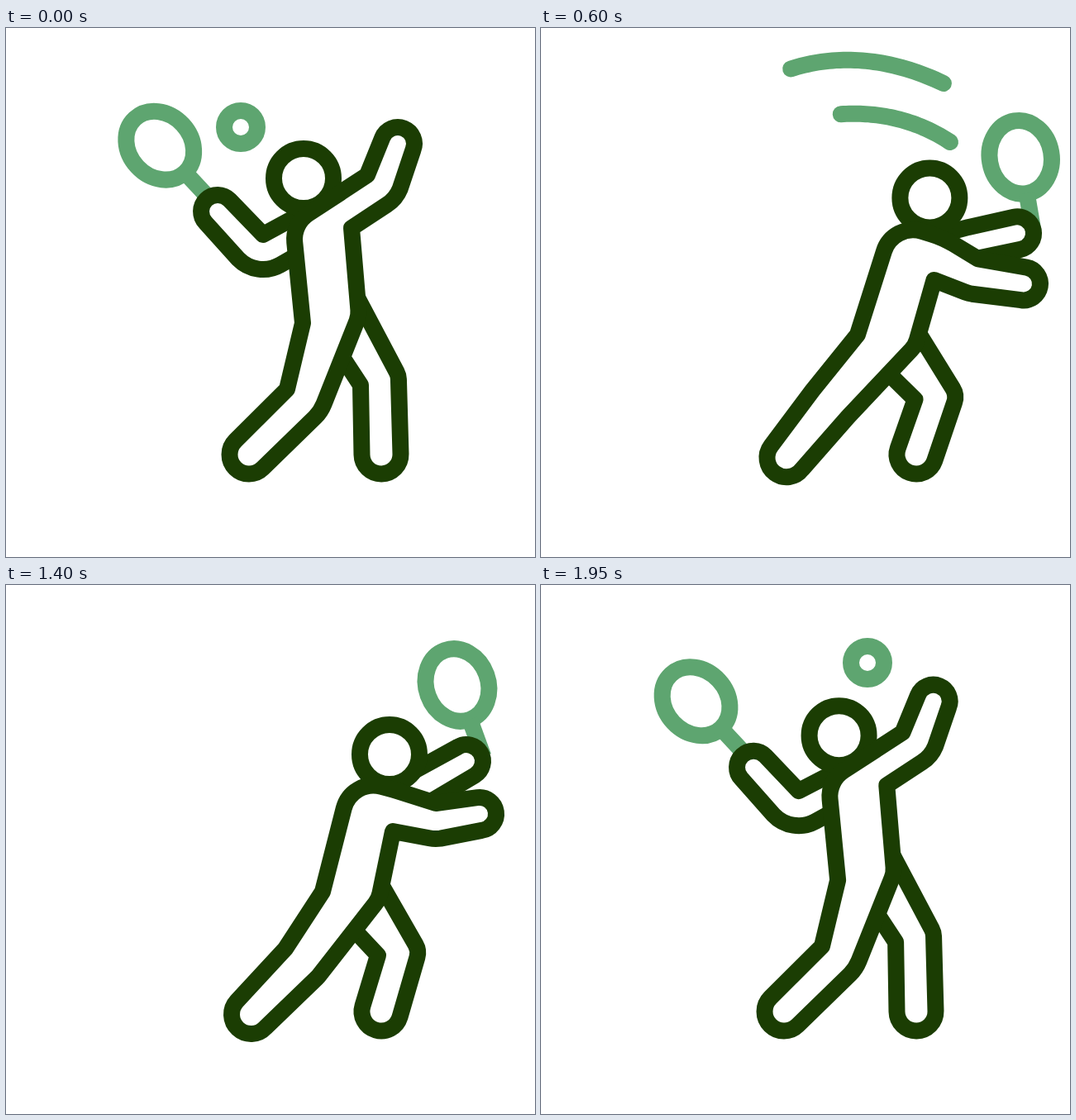
Animation, 640 px wide and 640 px high, one loop 2000 ms. Source, as an HTML page with a canvas:

```html
<!DOCTYPE html>
<html lang="en">
<head>
<meta charset="utf-8">
<title>Tennis swing</title>
<style>
html, body { margin: 0; width: 100%; height: 100%; overflow: hidden; background: #fff; }
canvas { display: block; width: 640px; height: 640px; }
</style>
</head>
<body>
<canvas id="stage" width="640" height="640"></canvas>
<script>
const c = document.getElementById('stage').getContext('2d');
const DARK = '#1b3d03', GREEN = '#5ea570';
const LOOP = 2000, STEP = 50, RAD = Math.PI / 180, Q90 = Math.PI / 2;

// Points are [x, y]; polar values are [degrees, distance]; girth is [knee, far elbow].
const ready = {
  head: [360, 182], neck: [347, 237], top: [405, 199], elbow: [437, 178], pit: [418, 242],
  hip: [427, 348], knee: [340, 437], foot: [294, 516], waist: [359, 357],
  farHip: [426, 328], farKnee: [429, 432], crotch: [410, 403], shoulder: [358, 248],
  fore: [-45.8, 53], farUpper: [177.6, 47], farFore: [207, 61.7],
  racket: [228.8, 106], tilt: [227], girth: [48, 42]
};
const strike = {
  head: [460, 200], neck: [420, 233], top: [480, 248], elbow: [523, 272], pit: [472, 300],
  hip: [451, 381], knee: [326, 437], foot: [296.5, 519], waist: [379, 369],
  farHip: [453, 364], farKnee: [451, 449], crotch: [418, 416], shoulder: [478, 262],
  fore: [30.5, 65], farUpper: [371, 41], farFore: [327, 58.5],
  racket: [276.7, 94.6], tilt: [264.7], girth: [53, 41]
};
const follow = {
  head: [481, 211], neck: [432, 238], top: [492, 259], elbow: [535, 287], pit: [479, 310],
  hip: [455, 387], knee: [331, 440], foot: [297.5, 520.5], waist: [387, 373],
  farHip: [460, 373], farKnee: [454, 450], crotch: [425, 422], shoulder: [495, 279],
  fore: [26.6, 60.4], farUpper: [373, 41], farFore: [329.5, 58],
  racket: [268.4, 89.5], tilt: [255.8], girth: [54, 37]
};
const recover = {
  head: [464, 205], neck: [418, 234], top: [470, 248], elbow: [520, 264], pit: [468, 298],
  hip: [451, 380], knee: [338, 440], foot: [296.5, 519.5], waist: [383, 371],
  farHip: [456, 366], farKnee: [450, 448], crotch: [420, 416], shoulder: [480, 262],
  fore: [13.8, 54.6], farUpper: [357, 37], farFore: [310.4, 61.7],
  racket: [263.2, 92.7], tilt: [250], girth: [52, 42]
};

const clamp = v => Math.max(0, Math.min(1, v));
const polar = ([x, y], a, d) => [x + d * Math.cos(a), y + d * Math.sin(a)];
const angle = (a, b) => Math.atan2(b[1] - a[1], b[0] - a[0]);
const dist = (a, b) => Math.hypot(b[0] - a[0], b[1] - a[1]);

function mix(a, b, k) {
  const out = {};
  for (const key in a) out[key] = a[key].map((v, i) => v + (b[key][i] - v) * k);
  return out;
}

function hermite(t, t0, v0, m0, t1, v1, m1) {
  const h = t1 - t0, s = (t - t0) / h, r = 1 - s;
  return v0 * (1 + 2 * s) * r * r + m0 * h * s * r * r
       + v1 * s * s * (3 - 2 * s) - m1 * h * s * s * r;
}

function poseAt(t) {
  if (t < 450) {
    const k = t < 220 ? hermite(t, 0, 0, 0, 220, 0.6, 0.004)
                      : hermite(t, 220, 0.6, 0.004, 450, 1, 0.00084);
    return mix(ready, strike, k);
  }
  if (t < 1100) return mix(strike, follow, 1 - ((1100 - t) / 650) ** 2.6);
  if (t < 1400) return mix(follow, recover, ((t - 1100) / 300) ** 3);
  const left = t < 1650 ? hermite(t, 1400, 1, -0.0017, 1650, 0.183, -0.00094)
                        : 0.1 * ((2000 - t) / 250) ** 1.8;
  return mix(ready, recover, left);
}

// Clockwise arc, left out when the sweep would run backwards.
function sweep(p, r, from, to) {
  const turn = 2 * Math.PI;
  const d = ((to - from) % turn + turn) % turn;
  const back = d > Math.PI + 0.01;
  c.arc(p[0], p[1], r, back ? to : from, back ? to : from + d);
}

const line = p => c.lineTo(p[0], p[1]);
const corner = (p, next, r) => c.arcTo(p[0], p[1], next[0], next[1], r);
const outerAngle = (p, j, r) => angle(j, p) + Math.acos(Math.min(1, r / dist(j, p)));

// Outer side, rounded end, then back to the inner joint.
// With a fillet, the outer joint is a tighter corner instead of an arc around j.
function limb(p, j, e, rj, re, fillet) {
  const phi = angle(j, e) + Math.asin(re / dist(j, e));
  const from = outerAngle(p, j, rj), to = phi - Q90;
  if (fillet) {
    const half = Math.atan2(Math.sin(to - from), Math.cos(to - from)) / 2;
    corner(polar(j, from + half, rj / Math.cos(half)), polar(e, to, re), fillet);
  } else {
    sweep(j, rj, from, to);
  }
  c.arc(e[0], e[1], re, phi - Q90, phi + Q90);
  line(j);
}

// The same form walked the other way round: inner joint first.
function limbBack(p, j, e, rj, re) {
  const phi = angle(j, e) - Math.asin(re / dist(j, e));
  line(j);
  c.arc(e[0], e[1], re, phi - Q90, phi + Q90);
  sweep(j, rj, phi + Q90, angle(j, p) - Math.acos(Math.min(1, rj / dist(j, p))));
  line(p);
}

function ink(color, fill) {
  if (fill) { c.fillStyle = '#fff'; c.fill(); }
  c.strokeStyle = color;
  c.stroke();
}

function ring([x, y], r, color, fill) {
  c.beginPath();
  c.arc(x, y, r, 0, 2 * Math.PI);
  ink(color, fill);
}

function trail(p, from, to) {
  if (to <= from) return;
  c.beginPath();
  for (let i = 0; i <= 40; i++) {
    const s = from + (to - from) * i / 40, r = 1 - s;
    line([0, 1].map(n => r * r * r * p[0][n] + 3 * r * r * s * p[1][n]
                       + 3 * r * s * s * p[2][n] + s * s * s * p[3][n]));
  }
  ink(GREEN);
}

function drawTrails(t) {
  const to = clamp((t - 110) / 310), from = clamp((t - 450) / 200) ** 2;
  trail([[153, 187], [203, 78], [330, -8], [487, 67]], from, to);
  trail([[216, 163], [280, 108], [400, 75], [495, 138]], from, to);
}

function drawBall(t) {
  const k = (t >= 1850 ? t - 1900 : t + 100) / 50;
  if (k <= 3) ring([566 - 201 * k + 30 * k * k, 72 + 20 * k + 2 * k * k], 20, GREEN);
  else if (t < 250) ring([233 + (t - 50) * 3.1, 150 - (t - 50) * 0.7], 20, GREEN);
}

function drawRacket(hand, m) {
  const mid = polar(hand, m.racket[0] * RAD, m.racket[1]);
  const a = m.tilt[0] * RAD;
  c.lineCap = 'butt';
  c.beginPath();
  c.ellipse(mid[0], mid[1], 44.5, 37.5, a, 0, 2 * Math.PI);
  ink(GREEN);
  c.beginPath();
  line(polar(mid, a, -44));
  line(polar(mid, a, -92));
  ink(GREEN);
  c.lineCap = 'round';
}

function drawFigure(m) {
  const up = m.farUpper[0] * RAD;
  const farElbow = polar(m.shoulder, up, m.farUpper[1]);
  const farHand = polar(farElbow, m.farFore[0] * RAD, m.farFore[1]);
  const hand = polar(m.elbow, m.fore[0] * RAD, m.fore[1]);
  const [kneeR, elbowR] = m.girth;

  drawRacket(farHand, m);

  const armStart = polar(m.shoulder, up - Q90, 23);
  c.beginPath();
  line(armStart);
  limb(armStart, farElbow, farHand, elbowR, 20);
  line(polar(m.shoulder, up + Q90, 23));
  ink(DARK, true);

  c.beginPath();
  line(m.farHip);
  limb(m.farHip, m.farKnee, [454, 516], 46, 23.5, 20);
  line(m.crotch);
  ink(DARK, true);

  ring(m.head, 36, DARK, true);

  c.beginPath();
  line(m.waist);
  corner(m.neck, m.top, 37);
  corner(m.top, m.elbow, 120);
  limbBack(m.pit, m.elbow, hand, 43, 20);
  corner(m.hip, polar(m.knee, outerAngle(m.hip, m.knee, kneeR), kneeR), 30);
  limb(m.hip, m.knee, m.foot, kneeR, 23.5);
  c.closePath();
  ink(DARK, true);
}

function draw(now) {
  const t = Math.floor((now % LOOP) / STEP) * STEP;
  c.fillStyle = '#fff';
  c.fillRect(0, 0, 640, 640);
  c.lineWidth = 20;
  c.lineCap = c.lineJoin = 'round';
  drawTrails(t);
  drawBall(t);
  drawFigure(poseAt(t));
}

let start = null;
function tick(now) {
  if (start === null) start = now;
  draw(Math.max(0, now - start));
  requestAnimationFrame(tick);
}
draw(0);
requestAnimationFrame(tick);
</script>
</body>
</html>
```
